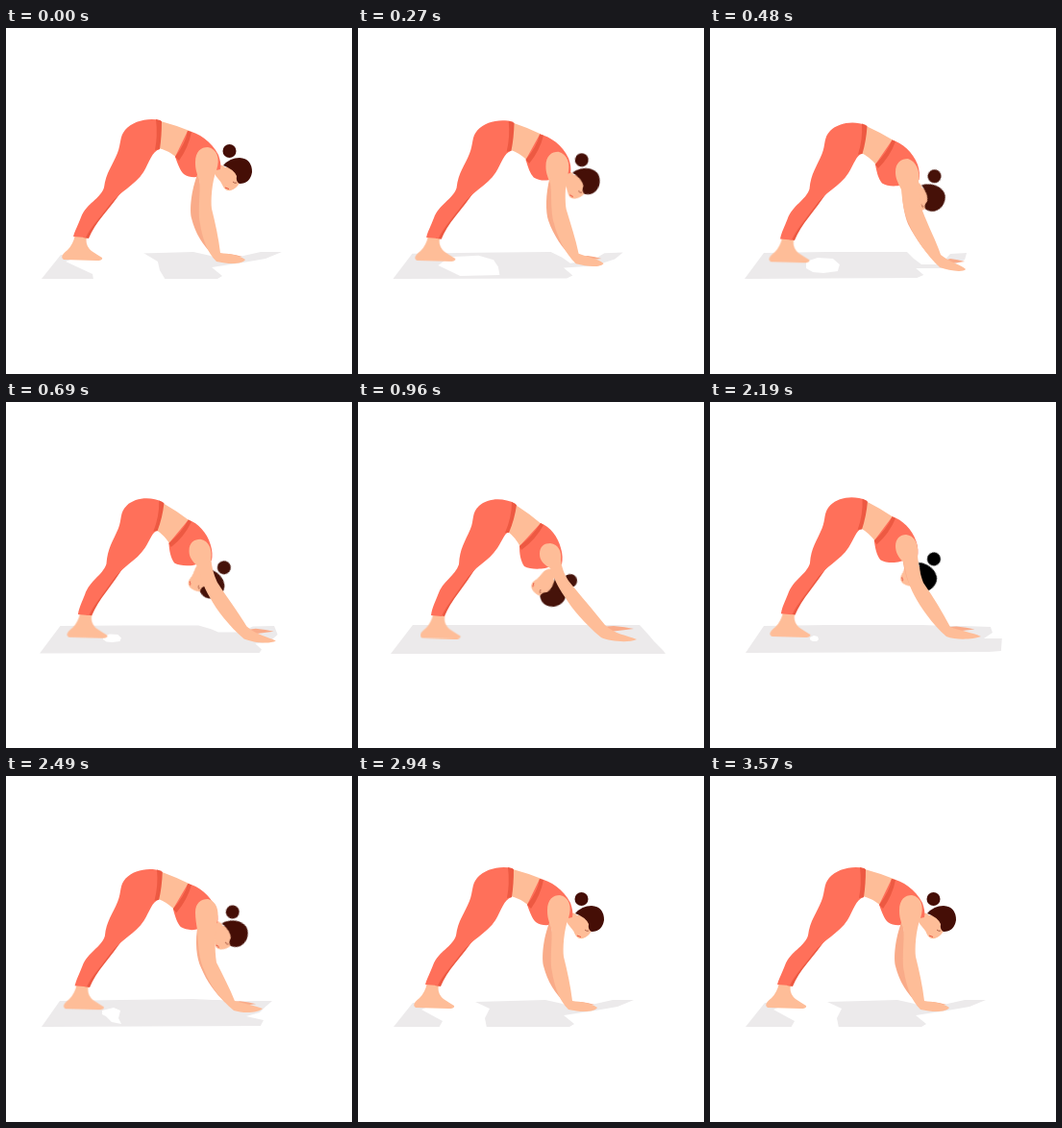
An HTML page without scripts that plays this animation: 360x360 px, repeating every 3.6 s.

```html
<!DOCTYPE html>
<html lang="en">
<head>
<meta charset="utf-8">
<title>Downward stretch</title>
<style>
html, body { margin: 0; width: 100%; height: 100%; overflow: hidden; background: #fff; }
svg { display: block; width: 100vw; height: 100vh; }

.move { animation: 3.6s infinite cubic-bezier(.37, 0, .63, 1); }
.skin { fill: #febd98; }
.shade { fill: #f9ab89; }
.cloth { fill: #ff705a; }
.fold { fill: #ed5942; }

.mat { fill: #eceaeb; animation-name: mat; animation-timing-function: linear; }
.gap { fill: #fff; animation-name: gap; animation-timing-function: linear; }
.foot { animation-name: foot; }
.calf { animation-name: calf; }
.leg { animation-name: leg; }
.waist { animation-name: waist; }
.belly { animation-name: belly; }
.top { animation-name: top; }
.band { animation-name: band; }
.far { animation-name: far; }
.near { animation-name: near; }
.head { animation-name: head; }
.hair { animation-name: hair; animation-timing-function: linear; }

@keyframes mat {
  0%, 81%, 100% { d: path("M57 236L122 235L195 233L213 237L222 243L247 237L265 233L287 233L270 240L247 244L214 249L225 258L220 261L37 261Z"); }
  13.33% { d: path("M56 234L122 233L205 233L212 240L220 246L240 246L250 235L267 234L265 241L245 250L214 250L222 257L215 260L36 261Z"); }
  26%, 50% { d: path("M57 232L120 232L195 232L215 232L222 232L247 232L265 232L293 232L303 243L308 249L312 253L317 258L320 262L34 262Z"); }
  60.83% { d: path("M56 233L120 232L195 232L215 232L222 232L247 233L265 233L292 234L294 240L285 246L304 246L303 259L290 260L37 261Z"); }
  69.17% { d: path("M56 234L120 233L195 232L215 233L222 233L237 235L255 234L277 234L270 240L264 246L250 250L268 254L265 260L37 261Z"); }
}
@keyframes gap {
  0% { d: path("M88 232L143 234L158 243L160 252L166 262L91 262L90 256L62 243Z"); }
  13.33% { d: path("M100 243L112 239L128 240L135 246L133 253L118 255L107 254L100 250Z"); }
  25%, 52% { d: path("M102 244L104 244L105 244L105 245L104 245L103 245L102 245L102 244Z"); }
  60.83% { d: path("M104 245L108 243L112 244L113 247L111 249L107 249L105 248L104 247Z"); }
  69.17% { d: path("M100 244L112 241L119 244L117 252L120 258L110 256L104 250L100 248Z"); }
  81%, 100% { d: path("M88 233L122 235L137 242L132 252L134 262L84 262L88 255L66 243Z"); }
}
@keyframes foot {
  0%, 81%, 100% { transform: none; }
  26.67%, 47% { transform: translate(6.500px, 4.500px); }
}
@keyframes calf {
  0%, 81%, 100% { d: path("M80 218L86 219Q91 207 101 195Q111 183 122 168L112 172Z"); }
  26.67%, 47% { d: path("M84 222L90 223Q95 211 105 198Q114 186 123 172L114 176Z"); }
}
@keyframes leg {
  0%, 81%, 100% { d: path("M161 96C147 93 132 97 124 106C118 113 120 120 116 130C111 143 104 150 102 166C98 178 84 182 78 197C75 205 72 210 70 217L83 218C88 207 98 197 107 185C118 170 134 164 143 150C149 140 152 128 160 126Z"); }
  26.67%, 47% { d: path("M164 106C151 99 135 100 126 108C118 115 121 123 117 132C111 146 106 152 105 169C101 181 88 186 83 201C80 209 77 214 76 222L87 223C92 212 102 200 111 187C121 171 136 166 145 152C151 143 152 137 157 135Z"); }
}
@keyframes waist {
  0%, 81%, 100% { d: path("M156 95L162 97Q162 113 160 126L155 127Q158 112 156 95Z"); }
  26.67%, 47% { d: path("M160 104L165 107Q163 122 157 136L153 136Q160 120 160 104Z"); }
}
@keyframes belly {
  0%, 81%, 100% { d: path("M161 97Q176 101 191 107L178 135Q168 127 159 125Z"); }
  26.67%, 47% { d: path("M164 107Q178 116 191 127L169 151Q164 141 156 135Z"); }
}
@keyframes top {
  0%, 81%, 100% { d: path("M189 107C200 109 214 118 221 132C223 138 224 142 223 147L210 150C204 156 192 157 185 152C181 148 179 142 176 134Z"); }
  26.67%, 47% { d: path("M190 126C200 130 208 140 211 152C213 158 213 164 212 169L200 171C196 174 180 175 173 171C169 165 168 158 168 150Z"); }
}
@keyframes band {
  0%, 81%, 100% { d: path("M189 107L193 108Q190 124 180 138L176 134Q187 120 189 107Z"); }
  26.67%, 47% { d: path("M190 126L193 128Q185 143 170 154L168 150Q182 139 190 126Z"); }
}
@keyframes far {
  0%, 83%, 100% { d: path("M200 150C192 170 191 190 193 198C197 214 205 226 215 236L232 235Q240 236 246 238L222 240L208 200Z"); animation-timing-function: ease-in; }
  13.33% { d: path("M200 160C199 178 202 194 206 204C214 220 226 236 236 244L250 240Q258 241 265 243L244 246L214 200Z"); animation-timing-function: ease-out; }
  26.67%, 48.5% { d: path("M200 160C204 175 212 190 222 202C232 214 242 224 252 234L266 233Q278 234 287 236L262 239L226 200Z"); }
}
@keyframes near {
  0%, 82%, 100% { d: path("M197 140C197 128 203 124 210 124C220 126 223 136 219 148C214 160 213 180 214 188C218 204 221 218 223 234C232 235 242 236 249 241C246 246 232 246 219 243C208 232 204 216 202 204C199 190 203 168 201 158C198 150 197 146 197 140Z"); animation-timing-function: ease-in; }
  13.33% { d: path("M193 150C193 140 199 136 206 136C215 139 219 150 217 160C217 170 219 181 221 190C227 206 235 221 240 236C250 244 262 247 266 251C262 255 248 252 239 249C226 237 213 218 208 206C201 192 200 178 199 168C195 160 193 156 193 150Z"); animation-timing-function: ease-out; }
  26.67%, 48% { d: path("M189 158C189 150 194 147 200 147C209 148 212 156 211 164C212 172 214 178 219 186C232 202 246 218 257 232C266 241 280 243 290 247C281 251 262 249 253 245C236 231 222 214 216 204C206 190 204 182 200 173C192 168 189 164 189 158Z"); animation-timing-function: ease-in; }
  60.83% { d: path("M193 150C193 142 198 138 204 138C213 139 217 148 216 157C216 168 219 180 222 188C233 204 242 219 250 234C260 238 274 240 282 244C274 247 256 248 246 244C231 231 219 213 213 202C206 189 204 178 201 166C196 162 193 156 193 150Z"); animation-timing-function: linear; }
  69.17% { d: path("M197 142C197 132 203 128 210 128C219 130 222 140 220 150C217 164 217 180 219 194C226 208 233 221 238 234C248 237 260 239 267 242C262 247 246 247 237 244C222 232 212 216 207 204C200 190 200 172 199 160C198 154 197 148 197 142Z"); animation-timing-function: ease-out; }
}
@keyframes head {
  0%, 81%, 100% { transform: translate(242px, 149px) rotate(0deg); animation-timing-function: ease-in; }
  13.33% { transform: translate(230.500px, 177px) rotate(32deg); animation-timing-function: ease-out; }
  26.67%, 48% { transform: translate(202px, 199px) rotate(80deg); animation-timing-function: ease-in; }
  60.83% { transform: translate(221.500px, 183.500px) rotate(54deg); animation-timing-function: linear; }
  69.17% { transform: translate(237.500px, 164.500px) rotate(20deg); animation-timing-function: ease-out; }
}
@keyframes hair {
  0%, 68%, 100% { fill: #450e06; }
  26.67%, 54% { fill: #46130a; }
  59%, 62% { fill: #000; }
}
</style>
</head>
<body>
<svg viewBox="0 0 360 360">
  <path class="move mat"/>
  <path class="move gap"/>

  <path class="move foot skin" d="M72 215L84 218Q82 226 89 232Q95 236 100 239Q101 242 94 242L60 241Q55 238 64 231Q70 225 72 215Z"/>
  <path class="move calf fold"/>
  <path class="move leg cloth"/>
  <path class="move belly skin"/>
  <path class="move waist fold"/>

  <g class="move head">
    <path class="skin" d="M-24-6Q-18-8-14-4L-4-4Q0 4 1 12Q-2 18-8 20Q-14 21-16 16Q-18 11-22 7Q-28 0-24-6Z"/>
    <path d="M-6 11Q-4 13-2 12" fill="none" stroke="#9b4a35" stroke-width=".8"/>
    <path d="M-14 17L-10 18.500" stroke="#e9533f"/>
    <g class="move hair">
      <path d="M-16-6Q-9-14 1-14Q14-13 14 1Q12 13 1 13Q-3 11-2 5Q-5-2-16-6Z"/>
      <circle cx="-9.500" cy="-21" r="7"/>
    </g>
  </g>

  <path class="move top cloth"/>
  <path class="move band fold"/>
  <path class="move far shade"/>
  <path class="move near skin"/>
</svg>
</body>
</html>
```
